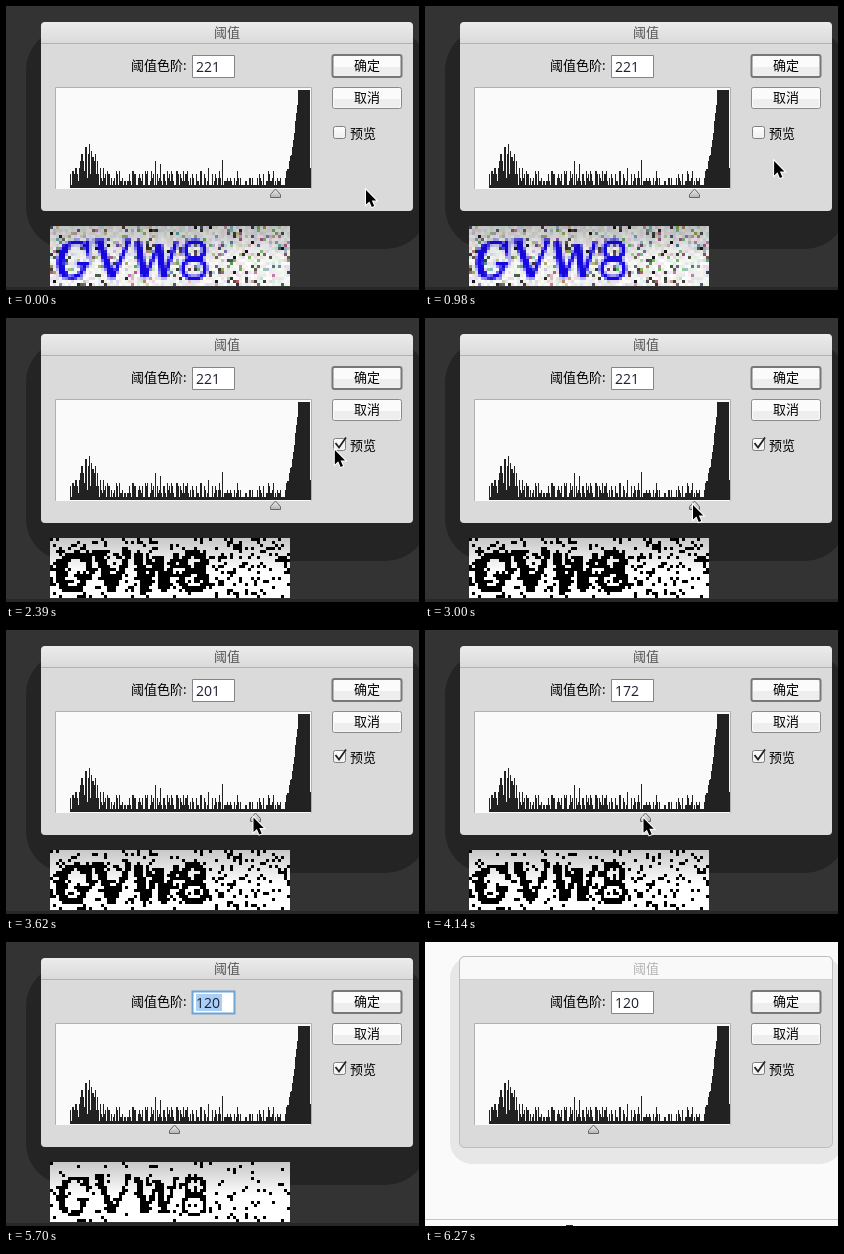
An HTML page with a canvas that plays this animation: 413x284 px, repeating every 6370 ms.

```html
<!DOCTYPE html>
<html lang="zh-CN">
<head>
<meta charset="utf-8">
<style>
html, body { margin: 0; width: 100%; height: 100%; overflow: hidden; background: #333; }
canvas { display: block; }
</style>
</head>
<body>
<canvas id="stage" width="413" height="284"></canvas>
<script>
const LOOP = 6370;
const CJK = "13px 'Noto Sans CJK SC', 'Noto Sans CJK', sans-serif";
const DIGITS = "14px 'Open Sans', sans-serif";
const ctx = document.getElementById('stage').getContext('2d');

let seed = 4711;
const rnd = () => (seed = seed * 16807 % 2147483647) / 2147483647;
const mix = (a, b, k) => a + (b - a) * k;

// Captcha: an 80 x 20 grid of 3px cells, each with a colour and a luminance
const COLS = 80, ROWS = 20;

function letterInk() {
  const small = document.createElement('canvas');
  small.width = COLS;
  small.height = ROWS;
  const g = small.getContext('2d');
  const pen = (width, d) => {
    g.lineWidth = width;
    g.stroke(new Path2D(d));
  };
  pen(1.6, 'M12.6 4.5V8.3Q11.5 5.3 8.8 5.3Q3.6 6 3.4 12Q3.5 17.2 7 17.2Q10.6 17 11.5 13.2M8.7 12.8H13.4');
  pen(2.6, 'M6 6.4Q3.6 8.5 3.5 12.5Q3.7 15.5 5.4 16.6');
  pen(2.5, 'M16.3 5L20.8 17.3M29.2 5L31.6 17.3M36.3 6L37.9 17.3');
  pen(1.6, 'M14.5 5H18.4M20.8 17.3L26.3 5M24.6 5H27M31.6 17.3L36.3 6M37.9 17.3L42.2 5');
  pen(1.8, 'M45.1 8a3.2 2.9 0 1 0 6.4 0a3.2 2.9 0 1 0 -6.4 0M44.2 14.2a3.8 3.2 0 1 0 7.6 0a3.8 3.2 0 1 0 -7.6 0');
  return g.getImageData(0, 0, COLS, ROWS).data;
}

function makeCells() {
  const ink = letterInk();
  return Array.from({ length: COLS * ROWS }, (_, i) => {
    const cover = (ink[i * 4 + 3] / 255) ** 1.3, r = rnd(), hue = rnd() * 360;
    let lum = 225 + 30 * rnd();
    if (r < 0.08) lum = 20 + 100 * rnd();
    else if (r < 0.2) lum = 120 + 100 * rnd();
    const light = lum / 2.55;
    let color = `hsl(${hue} ${light > 45 ? 35 : 12}% ${light}%)`;
    if (cover > 0.08) {
      lum = Math.min(lum, 255 - 215 * cover);
      color = `rgb(${mix(250, 22, cover)} ${mix(250, 8, cover)} ${mix(255, 225, cover)})`;
    }
    return { lum, color };
  });
}

// Histogram: quantised random counts under an envelope, plus a few spikes
function makeBars() {
  const spikes = { 20: 20, 25: 34, 27: 27, 29: 41, 32: 34, 99: 27, 104: 24, 152: 20, 166: 28, 212: 17, 217: 17 };
  return Array.from({ length: 255 }, (_, i) => {
    const r = rnd();
    if (i < 14) return 0;
    if (i > 241) return i > 253 ? 20 : 98;
    if (i > 229) return Math.round(Math.min(98, 13 + 80 * ((i - 229) / 13) ** 2 + 8 * r));
    if (spikes[i]) return spikes[i];
    const hump = 26 * Math.exp(-(((i - 32) / 12) ** 2));
    const ripple = i > 190 ? 12 : 17;
    return Math.round(3.4 * Math.floor((hump * (0.2 + 0.8 * r) + 3.5 + ripple * r ** 1.5) / 3.4));
  });
}

const cells = makeCells(), bars = makeBars();

// Fraction of a stepped move whose first step lands at its start
function steps(t, start, gap, count) {
  return Math.max(0, Math.min(count, Math.floor((t - start) / gap) + 1)) / count;
}

function valueAt(t) {
  const k = steps(t, 3360, 85.8, 23) * 23;
  if (k <= 10) return Math.round(221 - 4.9 * k);
  if (k <= 18) return Math.round(172 - 33 / 8 * (k - 10));
  return Math.round(139 - 3.8 * (k - 18));
}

function cursorAt(t) {
  if (t >= 5700) return null;
  if (t >= 5520) {
    const k = steps(t, 5520, 90, 3) * 3;
    return [mix(167, 200, k / 3), 189 + 31 * k];
  }
  if (t >= 3360) {
    const v = valueAt(t);
    return [v + 46.5, mix(187, 189, Math.min(1, (221 - v) / 80))];
  }
  if (t >= 2390) {
    const k = steps(t, 2390, 87, 8);
    return [mix(337.5, 268, k), mix(124, 187, k)];
  }
  const k = steps(t, 540, 87, 15), e = k + 0.35 * k * (1 - k);
  return [mix(360, 337.5, e), mix(184, 124, e)];
}

function rect(x, y, w, h, fill) {
  ctx.fillStyle = fill;
  ctx.fillRect(x, y, w, h);
}

function box(x, y, w, h, r, fill, stroke, width = 1) {
  ctx.beginPath();
  ctx.roundRect(x, y, w, h, r);
  ctx.fillStyle = fill;
  ctx.fill();
  if (!stroke) return;
  ctx.lineWidth = width;
  ctx.strokeStyle = stroke;
  ctx.stroke();
}

function text(str, x, y, color = '#000', align = 'left', font = CJK) {
  ctx.font = font;
  ctx.textAlign = align;
  ctx.fillStyle = color;
  ctx.fillText(str, x, y);
}

function vertical(y0, y1, ...colors) {
  const g = ctx.createLinearGradient(0, y0, 0, y1);
  colors.forEach((c, i) => g.addColorStop(i / (colors.length - 1), c));
  return g;
}

function button(y, h, label, border, width) {
  box(326.5, y, 69, h, 2, '#fbfbfb', border, width);
  rect(328, y + h / 2 + 1, 66, h / 2 - 2, '#eee');
  text(label, 361, Math.round(y + h / 2 + 4), '#000', 'center');
}

function drawCaptcha(preview, value) {
  cells.forEach((c, i) => {
    const fill = preview ? (c.lum < value ? '#000' : '#fff') : c.color;
    rect(44 + i % COLS * 3, 220 + Math.floor(i / COLS) * 3, 3, 3, fill);
  });
  rect(44, 220, 240, 34, vertical(220, 254, 'rgba(0,0,0,.22)', 'rgba(0,0,0,0)'));
}

function drawBackdrop(faded, preview, value) {
  rect(0, 0, 413, 284, faded ? '#fafafa' : '#333');
  if (faded) {
    box(25, 14, 392, 208, 22, '#e7e7e7');
    rect(0, 277, 413, 1, '#c6c6c6');
    rect(141, 283, 7, 1, '#222');
    return;
  }
  box(20, 22, 402, 221, 42, '#242424');
  rect(0, 281, 413, 3, '#2a2527');
  drawCaptcha(preview, value);
}

function drawDialog(faded, preview, value, focused) {
  box(35, 16, 372, 189, 4, '#dadada');
  if (faded) box(34.5, 14.5, 373, 191, 5, '#dadada', '#bdbdbd');
  const top = faded ? 15 : 16;
  box(35, top, 372, 37 - top, [5, 5, 0, 0], faded ? '#f9f9f9' : vertical(16, 37, '#ececec', '#dadada'));
  rect(35, 37, 372, 1, faded ? '#d0d0d0' : '#b2b2b2');
  text('阈值', 221, 31, faded ? '#b4b4b4' : '#555', 'center');

  text('阈值色阶:', 125, 64);
  box(186.5, 49.5, 42, 22, 0, '#fff', focused ? '#6fa3d6' : '#858585', focused ? 2 : 1);
  if (focused) rect(190, 52, 26, 17, '#a9cff6');
  text(value, 190, 66, '#1d2035', 'left', DIGITS);

  button(49, 22, '确定', '#777', 2);
  button(81.5, 21, '取消', '#8a8a8a', 1);
  box(327.5, 120.5, 12, 12, 2, vertical(120, 133, '#fff', '#eee'), '#808080');
  if (preview) {
    ctx.lineWidth = 1.8;
    ctx.strokeStyle = '#222';
    ctx.stroke(new Path2D('M329.5 125L333 129.5L340 119.5'));
  }
  text('预览', 344, 132);

  box(49.5, 81.5, 256, 101, 0, '#fafafa', '#b0b0b0');
  rect(50, 182, 255, 1, '#fafafa');
  bars.forEach((h, i) => rect(50 + i, 182 - h, 1, h, '#222'));
  drawHandle(value + 48.5);
}

function drawHandle(x) {
  ctx.beginPath();
  ctx.moveTo(x, 183);
  ctx.lineTo(x + 5, 188.5);
  ctx.lineTo(x + 5, 191.5);
  ctx.lineTo(x - 5, 191.5);
  ctx.lineTo(x - 5, 188.5);
  ctx.closePath();
  ctx.fillStyle = vertical(183, 192, '#eee', '#b0b0b0');
  ctx.fill();
  ctx.lineWidth = 1;
  ctx.strokeStyle = '#666';
  ctx.stroke();
}

function drawCursor([x, y]) {
  const arrow = new Path2D('M0 0V14.5L3.4 11.4L5.8 17L8.2 16L5.8 10.5H10.3Z');
  ctx.save();
  ctx.translate(x, y);
  ctx.lineWidth = 2;
  ctx.strokeStyle = '#fff';
  ctx.stroke(arrow);
  ctx.fillStyle = '#000';
  ctx.fill(arrow);
  ctx.restore();
}

function frame() {
  const t = performance.now() % LOOP;
  const faded = t >= 6270, preview = t >= 2120, value = valueAt(t), cursor = cursorAt(t);
  drawBackdrop(faded, preview, value);
  drawDialog(faded, preview, value, t >= 5520 && !faded);
  if (cursor) drawCursor(cursor);
  requestAnimationFrame(frame);
}
frame();
</script>
</body>
</html>
```
